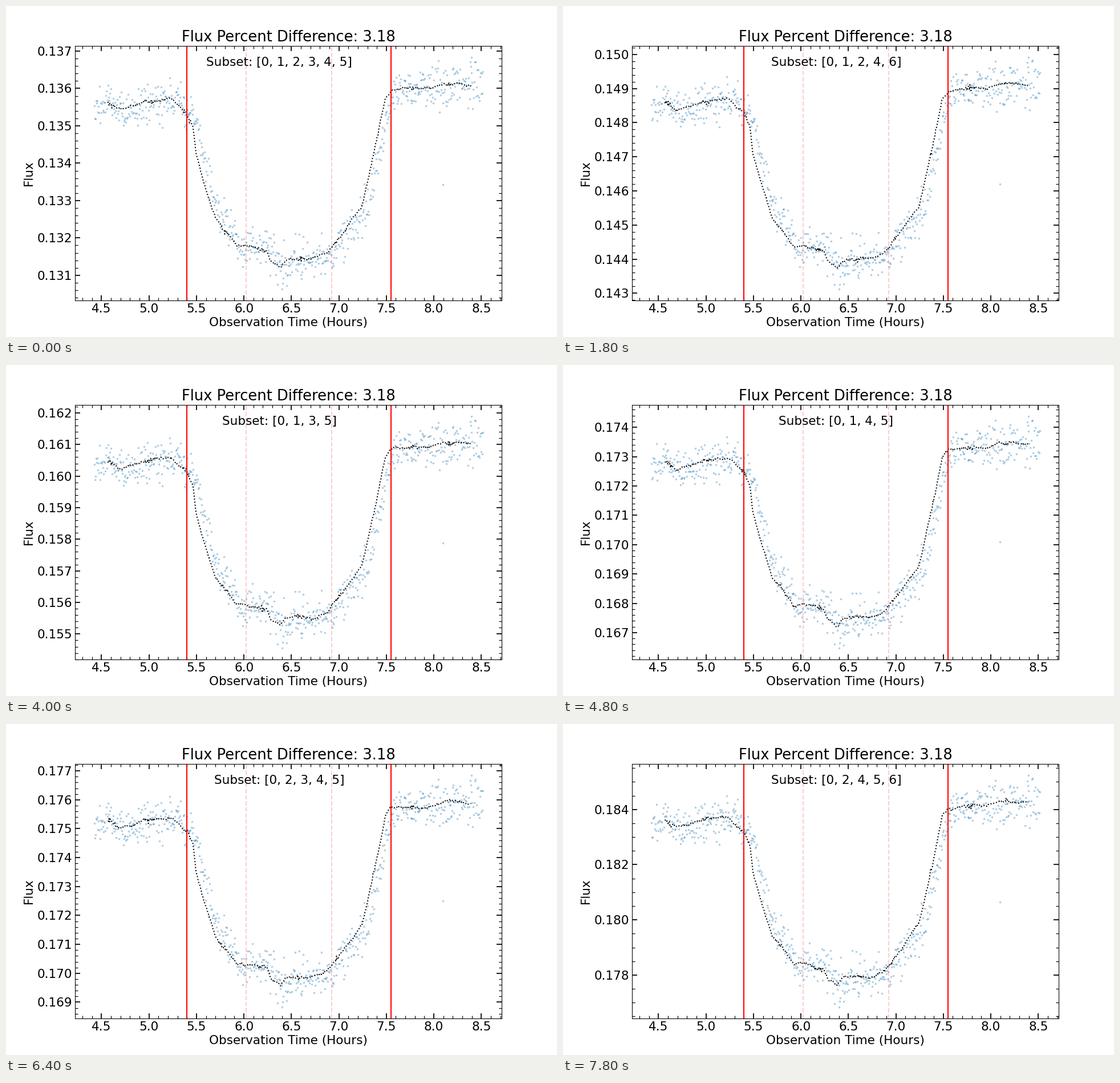
A matplotlib script that plays this animation: 966x580 px, repeating every 8 s.

```python
import itertools

import matplotlib.pyplot as plt
import numpy as np
from matplotlib.animation import FuncAnimation

W, H, DPI = 966, 580, 100
K = 0.966  # overall drawing scale
LEFT, RIGHT, TOP, BOTTOM = 0.125 * W, 0.9 * W, 0.12 * H, 0.89 * H
T_MIN, T_MAX = 4.2195, 8.717
CENTRE = 6.4735  # middle of the transit, hours
FRAMES = 40
HALF_SPAN = 0.0255  # half the visible flux range, relative to its middle

# Flux that each channel adds to the subset mean
LEVEL = np.array([0.5722, -0.0618, 0.1090, 0.0117, 0.0605, 0.1108, 0.0527])

# Key points of the smoothed light curve, in stage pixels
CURVE = np.array([
    (178, 168), (200, 182), (245, 168), (290, 163), (316, 186), (328, 212),
    (333, 258), (346, 305), (367, 372), (390, 400), (405, 421), (425, 420),
    (457, 428), (464, 446), (481, 457), (490, 444), (545, 441), (564, 432),
    (590, 398), (624, 351), (634, 308), (650, 235), (665, 162), (676, 147),
    (745, 143), (769, 136), (816, 138),
])
# Lowest and highest dots, then the lone outlier
STRAYS = np.array([(484, 496), (816, 90), (766, 312)])


def set_style():
    plt.rcParams.update({
        "font.family": "DejaVu Sans", "font.size": 16 * K,
        "axes.linewidth": 0.8 * K, "axes.titlepad": 6 * K,
        "axes.labelpad": 3.4 * K,
    })
    for tick, far in (("xtick", "top"), ("ytick", "right")):
        plt.rcParams.update({
            f"{tick}.direction": "in", f"{tick}.{far}": True,
            f"{tick}.minor.visible": True,
            f"{tick}.major.size": 7 * K, f"{tick}.minor.size": 4 * K,
            f"{tick}.major.width": 1.3 * K, f"{tick}.minor.width": 0.9 * K,
            f"{tick}.major.pad": 3.5 * K,
        })


def to_time(x):
    return T_MIN + (x - LEFT) / (RIGHT - LEFT) * (T_MAX - T_MIN)


def to_unit(y):
    return (BOTTOM - y) / (BOTTOM - TOP)


def smooth(values, n):
    return np.convolve(values, np.ones(n) / n, "same")


# Sorted as text, so a longer list comes before the prefix it extends
SUBSETS = sorted(([0, *rest] for n in range(1, 6)
                  for rest in itertools.combinations(range(1, 7), n)), key=str)

rng = np.random.default_rng(11)
dot_x = np.linspace(155, 836, 670)
trend = np.interp(dot_x - 10, *CURVE.T) + 6 * (dot_x < 215)
dot_y = trend + np.clip(rng.normal(0, 18, dot_x.size), -45, 45)
dot_x = np.append(STRAYS[:, 0], dot_x)
dot_y = np.append(STRAYS[:, 1], np.clip(dot_y, 98, 488))

line_x = np.arange(178.5, 816.5)
line_y = np.interp(line_x, *CURVE.T)
# The running average is jagged in short, regular stretches
rough = 0.7 + 1.6 * np.maximum(0, np.cos(2 * np.pi * (line_x - 185) / 66)) ** 4

set_style()
fig, ax = plt.subplots(figsize=(W / DPI, H / DPI), dpi=DPI)
fig.subplots_adjust(left=0.125, right=0.9, bottom=0.11, top=0.88)
fig.patch.set_facecolor("white")
dots, = ax.plot([], [], "o", ms=2.6 * K, mew=0, color="C0", alpha=0.36)
curve, = ax.plot([], [], ":", lw=1.5 * K, color="black")
for side in (-1, 1):
    ax.axvline(CENTRE + side * 1.0755, color="red", lw=1.5 * K)
    ax.axvline(CENTRE + side * 0.4505, color="red", lw=1.5 * K, ls="--", alpha=0.2)
label = ax.text(0.4785, 0.921, "", transform=ax.transAxes, ha="center")
title = ax.set_title("")
ax.set_xlim(T_MIN, T_MAX)
ax.set_xlabel("Observation Time (Hours)")
ax.set_ylabel("Flux")


def draw(i):
    subset = SUBSETS[i]
    mid = LEVEL[subset].mean()
    low, high = mid * (1 - HALF_SPAN), mid * (1 + HALF_SPAN)

    noise = np.random.default_rng(100 + i)
    shake = noise.normal(0, 1.5, dot_y.size)
    shake[:2] = 0  # the extreme dots set the axis limits
    drift = smooth(noise.normal(0, 5, line_x.size), 15)
    wiggle = drift + noise.normal(0, 1, line_x.size) * rough

    dots.set_data(to_time(dot_x), low + (high - low) * to_unit(dot_y + shake))
    curve.set_data(to_time(line_x), low + (high - low) * to_unit(line_y + wiggle))
    ax.set_ylim(low, high)
    label.set_text(f"Subset: {subset}")
    depth = 3.19 if 1 in subset and mid > 0.18 else 3.18
    title.set_text(f"Flux Percent Difference: {depth}")
    return dots, curve, label, title


anim = FuncAnimation(fig, draw, frames=FRAMES, init_func=lambda: draw(0),
                     interval=200, repeat=True, repeat_delay=0, blit=False)
plt.show()
```
